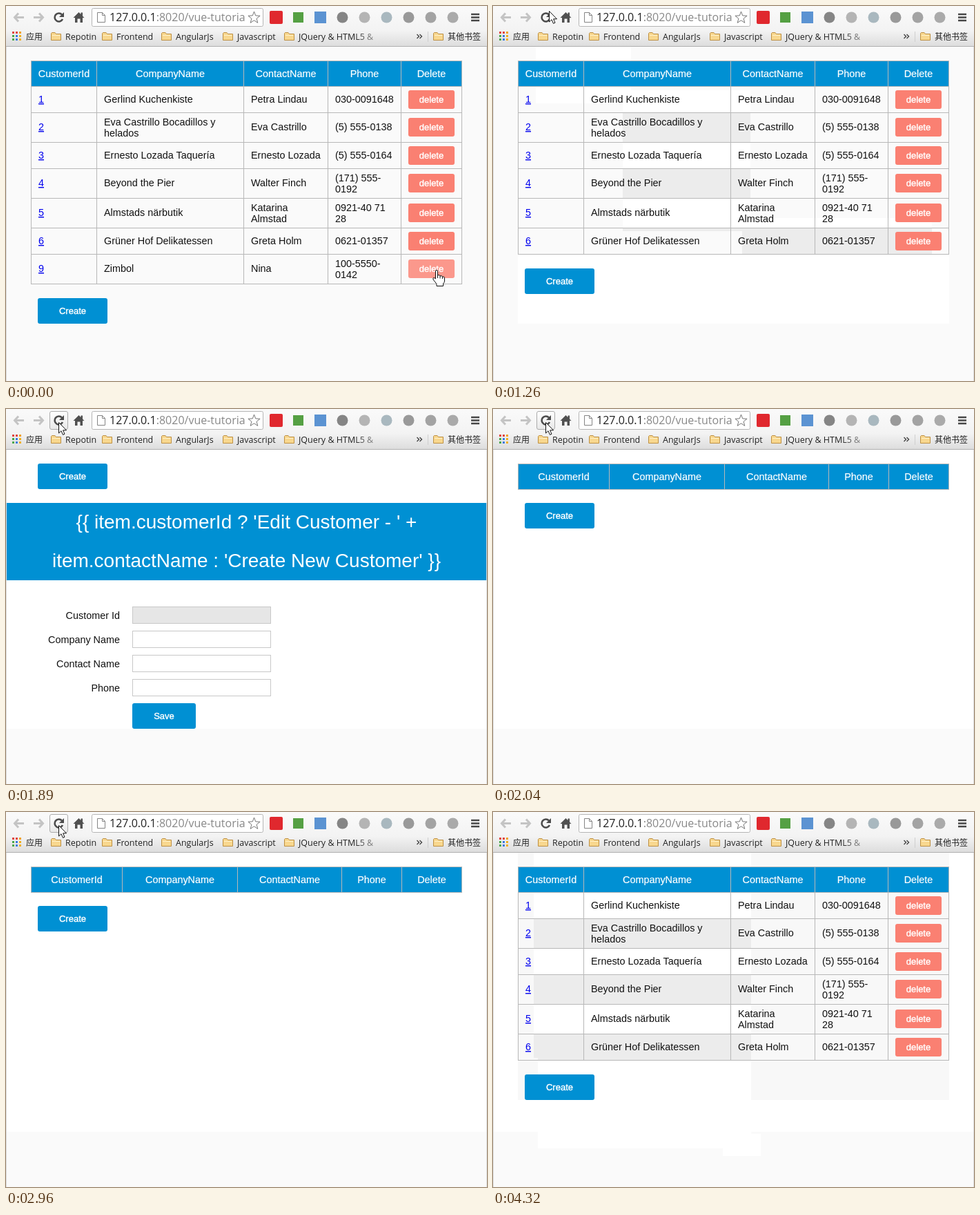
An HTML page for the animation above (5.16 s loop, 697 by 543 pixels).

```html
<!DOCTYPE html>
<html lang="en">
<head>
<meta charset="utf-8">
<title>Customer list</title>
<style>
html, body { margin: 0; width: 100%; height: 100%; overflow: hidden; background: #fafafa; }
svg { display: block; width: 697px; height: 543px; }
text { white-space: pre; }
.page { font: 14.4px "Liberation Sans", Arial, sans-serif; fill: #111; }
.page .btn { font-size: 13px; fill: #fff; stroke: #fff; stroke-width: .4px; text-anchor: middle; }
.page .head { fill: #fff; stroke: #fff; stroke-width: .2px; text-anchor: middle; }
.page .link { fill: #00e; text-decoration: underline 1px; }
.page .title { font-size: 28px; fill: #fff; text-anchor: middle; }
.page .label { text-anchor: end; }
.url { font: 16px "Open Sans", sans-serif; fill: #888; }
.mark { font: 12.5px "Open Sans", sans-serif; fill: #222; }
.cjk { font: 12px "Noto Sans CJK SC", "Noto Sans CJK", sans-serif; fill: #222; }
</style>
</head>
<body>
<svg id="stage" viewBox="0 0 697 543">
  <defs>
    <linearGradient id="bar" x2="0" y2="1">
      <stop offset="0" stop-color="#fafafa"/><stop offset=".6" stop-color="#f3f3f3"/><stop offset="1" stop-color="#dcdcdc"/>
    </linearGradient>
    <linearGradient id="key" x2="0" y2="1"><stop stop-color="#fff"/><stop offset="1" stop-color="#e8e8e8"/></linearGradient>
    <linearGradient id="fade" gradientUnits="userSpaceOnUse" x1="505" x2="540">
      <stop stop-color="#222"/><stop offset="1" stop-color="#222" stop-opacity=".3"/>
    </linearGradient>
    <clipPath id="clean"><path id="patch"/></clipPath>
    <clipPath id="urlBox"><rect x="146" y="4" width="204" height="26"/></clipPath>
  </defs>
</svg>
<script>
const NS = 'http://www.w3.org/2000/svg';
const BLUE = '#0090d3', PINK = '#fa8072', LINE = '#b8b8b8';
const stage = document.getElementById('stage');

function add(parent, tag, attrs, text) {
  const el = document.createElementNS(NS, tag);
  for (const k in attrs) el.setAttribute(k, attrs[k]);
  if (text !== undefined) el.textContent = text;
  parent.appendChild(el);
  return el;
}
const group = (parent, cls = '') => add(parent, 'g', { class: cls });
const rect = (p, x, y, width, height, fill, more) => add(p, 'rect', { x, y, width, height, fill, ...more });
const text = (p, x, y, s, cls = '') => add(p, 'text', { x, y, class: cls }, s);
const path = (p, d, more) => add(p, 'path', { d, fill: 'none', ...more });

function button(p, x, y, w, h, label, fill) {
  rect(p, x, y, w, h, fill, { rx: 3 });
  text(p, x + w / 2, y + Math.floor(h / 2) + 5, label, 'btn');
}

// page background
rect(stage, 0, 0, 697, 543, '#fafafa');
const tint = rect(stage, 36, 59, 625, 358, '#f8f8f8');
const clean = add(stage, 'g', { 'clip-path': 'url(#clean)' });
rect(clean, 0, 59, 697, 484, '#fff');
const stripes = group(clean);
const patch = document.getElementById('patch');

// table
const cols = [36, 131, 344, 466, 572, 660];
const tops = [116, 154, 197, 235, 278, 321, 359, 402];
const heads = ['CustomerId', 'CompanyName', 'ContactName', 'Phone', 'Delete'];
const rows = [
  ['1', 'Gerlind Kuchenkiste', 'Petra Lindau', '030-0091648'],
  ['2', 'Eva Castrillo Bocadillos y|helados', 'Eva Castrillo', '(5) 555-0138'],
  ['3', 'Ernesto Lozada Taquería', 'Ernesto Lozada', '(5) 555-0164'],
  ['4', 'Beyond the Pier', 'Walter Finch', '(171) 555-|0192'],
  ['5', 'Almstads närbutik', 'Katarina|Almstad', '0921-40 71|28'],
  ['6', 'Grüner Hof Delikatessen', 'Greta Holm', '0621-01357'],
  ['9', 'Zimbol', 'Nina', '100-5550-|0142']
];

function grid(p, xs, top, bottom) {
  const d = xs.map(x => `M${x + .5} ${top}V${bottom + 1}`).join('') + `M36 ${bottom + .5}H661`;
  path(p, d, { stroke: LINE });
}
function header(p, xs) {
  rect(p, 36, 79, 625, 38, BLUE);
  path(p, 'M36 79.5H661', { stroke: LINE });
  grid(p, xs, 79, 116);
  heads.forEach((s, i) => text(p, (xs[i] + xs[i + 1] + 1) / 2, 103, s, 'head'));
}
function row(p, i, fill = PINK) {
  const mid = Math.floor((tops[i] + tops[i + 1]) / 2);
  grid(p, cols, tops[i] + 1, tops[i + 1]);
  rows[i].forEach((cell, c) => {
    const lines = cell.split('|');
    lines.forEach((s, n) => text(p, cols[c] + 11, mid + (lines[1] ? n * 16 - 2 : 5), s, c ? '' : 'link'));
  });
  button(p, 583, mid - 13, 67, 27, 'delete', fill);
}

const page = group(stage, 'page');
const list = group(page), last = group(page), empty = group(page), form = group(page), create = group(page);
header(list, cols);
for (let i = 0; i < 6; i++) {
  row(list, i);
  if (i % 2) rect(stripes, 36, tops[i], 625, tops[i + 1] - tops[i], '#ececec');
}
row(last, 6, '#fb988c');
header(empty, [36, 168, 335, 486, 573, 660]);
button(create, 46, 0, 101, 37, 'Create', BLUE);

// form
rect(form, 1, 136, 695, 112, BLUE);
text(form, 348.5, 173, "{{ item.customerId ? 'Edit Customer - ' +", 'title');
text(form, 348.5, 229, "item.contactName : 'Create New Customer' }}", 'title');
['Customer Id', 'Company Name', 'Contact Name', 'Phone'].forEach((s, i) => {
  text(form, 165, 304 + i * 35, s, 'label');
  rect(form, 183.5, 286.5 + i * 35, 200, 24, i ? '#fff' : '#e6e6e6', { stroke: '#c8c8c8' });
});
button(form, 183, 426, 92, 37, 'Save', BLUE);
path(stage, 'M.5 59V543M696.5 59V543', { stroke: '#dcdcdc' });

// browser bar
const bar = group(stage);
rect(bar, 0, 0, 697, 59, 'url(#bar)');
path(bar, 'M0 58.5H697', { stroke: '#b0b0b0' });
const arrow = { stroke: '#c4c4c4', 'stroke-width': 3 };
path(bar, 'M18 10.5L12.5 16.5L18 22.5M13 16.5H26', arrow);
path(bar, 'M48 10.5L53.5 16.5L48 22.5M53 16.5H40', arrow);
const key = rect(bar, 63.5, 3.5, 26, 26, 'url(#key)', { rx: 2.5, stroke: '#ababab' });
path(bar, 'M81 12.4A6 6 0 1 0 82 19', { stroke: '#4c4c4c', 'stroke-width': 2.6 });
path(bar, 'M84 9V16H77Z', { fill: '#4c4c4c' });
path(bar, 'M97.5 17L105.5 9L108.5 12V9.5H111V14.5L113.5 17H111V24H107.5V18.5H103.5V24H100V17Z', { fill: '#505050' });
rect(bar, 124.5, 3.5, 248, 26, '#fff', { rx: 2, stroke: '#b5b5b5' });
path(bar, 'M132.5 9.5H139.5L143.5 13.5V23.5H132.5ZM139.5 9.5V13.5H143.5', { stroke: '#858585', fill: '#fff' });
const url = add(bar, 'text', { x: 150, y: 22, class: 'url', 'clip-path': 'url(#urlBox)' });
add(url, 'tspan', { fill: '#222' }, '127.0.0.1');
add(url, 'tspan', {}, ':8020/vue-tutoria');

let star = '';
for (let i = 0; i < 10; i++) {
  const r = i % 2 ? 3.8 : 9, a = i * Math.PI / 5;
  star += (i ? 'L' : 'M') + (359.5 + r * Math.sin(a)).toFixed(1) + ' ' + (17 - r * Math.cos(a)).toFixed(1);
}
path(bar, star + 'Z', { stroke: '#777', fill: '#fff' });

// extension buttons
rect(bar, 382, 7, 19, 19, '#e0282e', { rx: 2 });
rect(bar, 416, 9, 15, 15, '#55a043');
rect(bar, 447, 8, 17, 17, '#5b93d2');
['#858585', '#b4b4b4', '#a9b8bf', '#999', '#a3a3a3', '#aaa'].forEach((fill, i) =>
  add(bar, 'circle', { cx: 487.5 + i * 32, cy: 16.5, r: 8, fill }));
path(bar, 'M674 12H686M674 16.5H686M674 21H686', { stroke: '#484848', 'stroke-width': 2.4 });

// bookmarks
['#e0443e', '#e0443e', '#f0a020', '#4aa84a', '#3c7be0', '#f0b020', '#4aa84a', '#3c7be0', '#f0b020'].forEach((c, i) =>
  rect(bar, 9 + i % 3 * 5, 37 + Math.floor(i / 3) * 5, 3, 3, c));
text(bar, 29, 49, '应用', 'cjk');
const marks = [[65, 'Repotin'], [139, 'Frontend'], [225, 'AngularJs'], [314, 'Javascript'], [403, 'JQuery & HTML5 &'], [619, '其他书签']];
marks.forEach(([x, s], i) => {
  path(bar, `M${x + .5} 49.5V39.5L${x + 1.5} 38.5H${x + 6}L${x + 7.5} 40.5H${x + 14.5}V49.5Z`, { fill: '#f8d78e', stroke: '#bd9044' });
  path(bar, `M${x + 2} 42.5H${x + 13}`, { stroke: '#fff0c8' });
  const t = text(bar, x + 21, 49, s, i === 5 ? 'cjk' : 'mark');
  if (i === 4) t.style.fill = 'url(#fade)';
});
path(bar, 'M595.5 41L598.5 44L595.5 47M599.5 41L602.5 44L599.5 47', { stroke: '#444', 'stroke-width': 1.4 });
path(bar, 'M611.5 37V52', { stroke: '#cfcfcf' });

// pointers, with the tip at 0,0
const ink = { fill: '#fff', stroke: '#111', 'stroke-linejoin': 'round' };
const pointer = path(stage, 'M.5 .5V16L4 12.7L6.5 18.3L9 17.2L6.6 11.8H11.5Z', ink);
const hand = path(stage, 'M-1.5 13V2Q-1.5 .5 0 .5T1.5 2V8Q4.5 6.5 5 9Q8 7.8 8.4 10Q11.5 9.3 11.5 12V16Q11.5 18.5 9.5 20V23.5H0V20.5L-5 14Q-5.8 12 -4 11.5Q-2.7 11.7 -1.5 13ZM1.5 8V12M5 9V12.5M8.4 10V13', ink);

// areas [left, top, right, bottom] repainted in clear white and stripes
const createTop = { full: 423, list: 380, form: 79, empty: 136 };
const below = [36, 360, 661, 460], whole = [1, 59, 696, 463];
const path1 = [below, [361, 307, 636, 401]], path2 = [...path1, [188, 122, 373, 326]];
const path3 = [...path2, [62, 59, 200, 141]];
const frame = [[1, 59, 36, 463], [661, 59, 696, 463], [36, 417, 661, 463]];
const trail1 = [...frame, [59, 59, 374, 356]], trail2 = [...trail1, [65, 59, 374, 487]];
const trail3 = [...trail2, [333, 466, 388, 498]];

// time in ms, then what changes
const LOOP = 5160;
const steps = [
  [0, { view: 'full', at: [624, 382], hand: true, key: '', clean: [] }],
  [430, { view: 'list', hand: false, clean: [below] }],
  [960, { at: [361, 307], clean: path1 }],
  [1110, { at: [188, 122], clean: path2 }],
  [1260, { at: [81, 7], clean: path3 }],
  [1380, { at: [76, 19], key: 'url(#key)' }],
  [1530, { key: '#dcdcdc' }],
  [1650, { key: 'url(#key)' }],
  [1890, { view: 'form', clean: [whole] }],
  [2040, { view: 'empty' }],
  [2170, { view: 'list' }],
  [2720, { key: '#dcdcdc' }],
  [2840, { key: 'url(#key)' }],
  [2960, { view: 'empty' }],
  [3080, { view: 'list', clean: frame }],
  [3230, { at: [95, 42], key: '' }],
  [3350, { at: [362, 337], clean: trail1 }],
  [3500, { at: [333, 466], clean: trail2 }],
  [3620, { at: [333, 468] }],
  [3770, { at: [333, 466] }],
  [4170, { at: [376, 479], clean: trail3 }],
  [4320, { at: null }]
];

const show = (el, on) => { el.style.display = on ? '' : 'none'; };

function draw(t) {
  const s = {};
  for (const [start, change] of steps) if (start <= t) Object.assign(s, change);
  const table = s.view === 'full' || s.view === 'list';
  show(list, table);
  show(stripes, table);
  show(last, s.view === 'full');
  show(empty, s.view === 'empty');
  show(form, s.view === 'form');
  show(tint, t >= 3080);
  create.setAttribute('transform', `translate(0 ${createTop[s.view]})`);
  patch.setAttribute('d', s.clean.map(([l, t, r, b]) => `M${l} ${t}H${r}V${b}H${l}Z`).join('') || 'M0 0');
  show(key, s.key);
  if (s.key) key.setAttribute('fill', s.key);
  show(pointer, s.at && !s.hand);
  show(hand, s.at && s.hand);
  if (s.at) (s.hand ? hand : pointer).setAttribute('transform', `translate(${s.at})`);
}

const begin = performance.now();
function tick(now) {
  draw(Math.max(0, now - begin) % LOOP);
  requestAnimationFrame(tick);
}
tick(begin);
</script>
</body>
</html>
```
